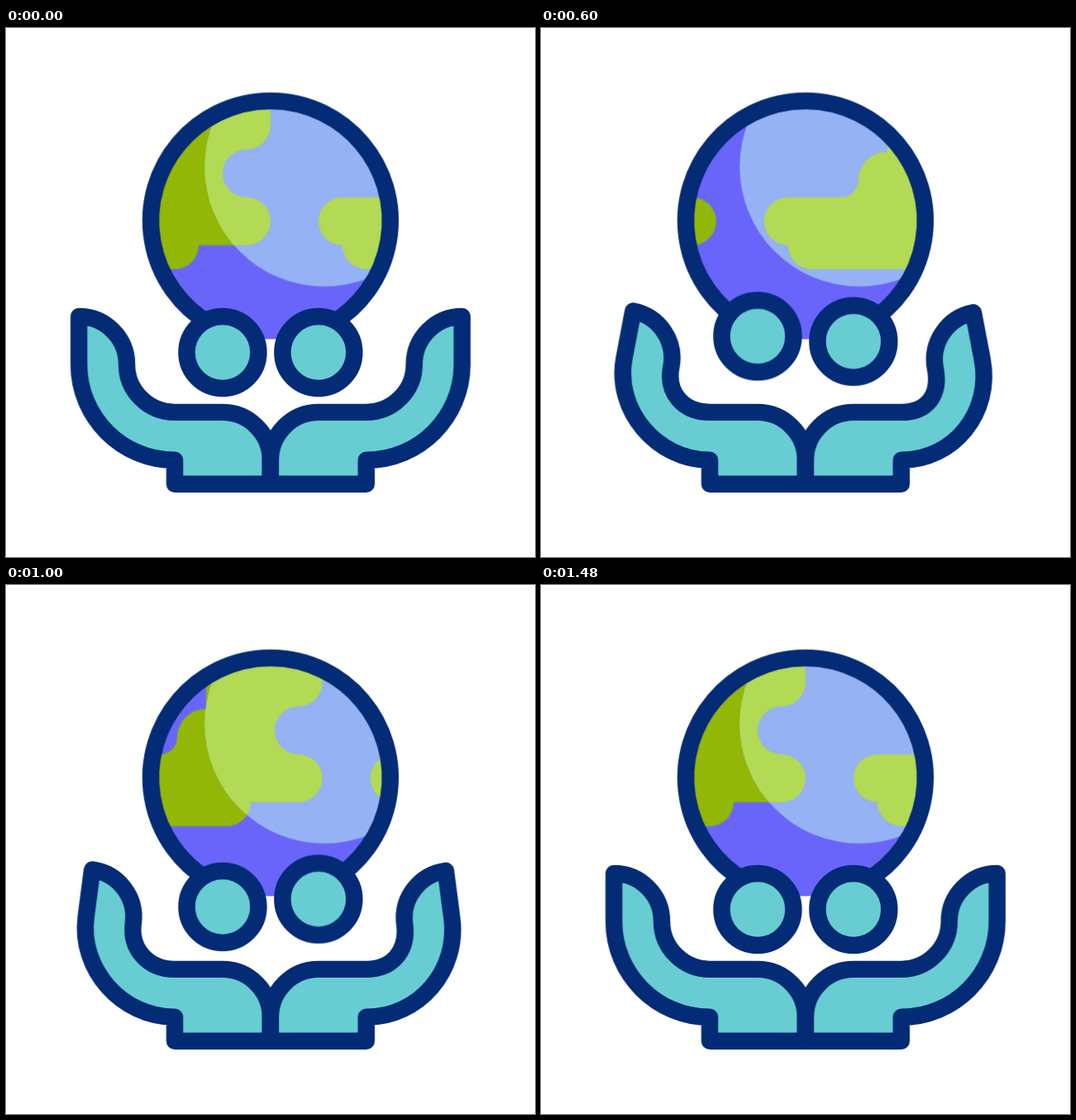
An HTML page for the animation above (1600 ms loop, 640x640 px).

```html
<!DOCTYPE html>
<html lang="en">
<head>
<meta charset="utf-8">
<title>Earth in caring hands</title>
<style>
  html, body { margin: 0; width: 100%; height: 100%; overflow: hidden; background: #fff; }
  svg { display: block; width: 100%; height: 100%; }

  .line { fill: #67cdd2; stroke: #032b76; stroke-width: .707; stroke-linejoin: round; stroke-linecap: round; }
  .ring { fill: none; }
  .sea { fill: #6a65fa; }
  .soil { fill: #92b706; }
  .lit .sea { fill: #94b2f4; }
  .lit .soil { fill: #b2da54; }

  .land { animation: spin 1.6s infinite; }
  .head { animation: 1.6s cubic-bezier(.53, 0, .47, 1) infinite; }
  .head.l { animation-name: hop-l; }
  .head.r { animation-name: hop-r; }
  .hand { animation: 1.6s cubic-bezier(.45, 0, .55, 1) infinite; }
  .hand.l { animation-name: bend-l; }
  .hand.r { animation-name: bend-r; }

  @keyframes spin {
    0% { transform: translateX(0); animation-timing-function: cubic-bezier(.527, 0, .473, 1); }
    92.5%, 100% { transform: translateX(-12px); }
  }
  @keyframes hop-l {
    0%, 14.3%, 71.2%, 100% { transform: translateY(0); }
    42.7% { transform: translateY(-.71px); }
  }
  @keyframes hop-r {
    0%, 21.3%, 78.2%, 100% { transform: translateY(0); }
    49.8% { transform: translateY(-.71px); }
  }
  @keyframes bend-l {
    0%, 5.6%, 85.3%, 100% {
      d: path("M-8 9L-8 11C-8 13.21 -6.21 15 -4 15L-4 16L0 16L0 15C0 13.9 -.9 13 -2 13L-4 13C-5.1 13 -6 12.1 -6 11C-6 9.9 -6.9 9 -8 9Z");
    }
    44.7%, 46.25% {
      d: path("M-7.145 8.762L-7.543 10.722C-7.982 12.887 -6.21 15 -4 15L-4 16L0 16L0 15C0 13.9 -.9 13 -2 13L-4 13C-5.1 13 -5.803 12.202 -5.583 11.119C-5.363 10.036 -6.062 8.982 -7.145 8.762Z");
    }
  }
  @keyframes bend-r {
    0%, 5.6%, 85.3%, 100% {
      d: path("M-8 9L-8 11C-8 13.21 -6.21 15 -4 15L-4 16L0 16L0 15C0 13.9 -.9 13 -2 13L-4 13C-5.1 13 -6 12.1 -6 11C-6 9.9 -6.9 9 -8 9Z");
    }
    44.7%, 46.25% {
      d: path("M-6.944 8.831L-7.342 10.791C-7.781 12.956 -6.21 15 -4 15L-4 16L0 16L0 15C0 13.9 -.9 13 -2 13L-4 13C-5.1 13 -5.602 12.271 -5.382 11.188C-5.162 10.105 -5.861 9.051 -6.944 8.831Z");
    }
  }
</style>
</head>
<body>
<svg viewBox="0 0 640 640">
  <defs>
    <clipPath id="globe"><circle cy="5" r="4.95"/></clipPath>
    <clipPath id="light"><circle cx="2.25" cy="2.75" r="5"/></clipPath>
    <path id="soil" d="M12 -1V1A1 1 0 0 1 11 2A1 1 0 0 0 11 4A1 1 0 0 1 11 6H9A1 1 0 0 1 8 7H4A1 1 0 0 1 3 6A1 1 0 0 1 3 4H5.24A.69 .69 0 0 0 5.93 3.31A1.21 1.21 0 0 1 7.14 2.1V-1Z"/>
  </defs>

  <!-- one unit of the icon grid is 28.975 px -->
  <g transform="translate(320 88.2) scale(28.975)">
    <g clip-path="url(#globe)">
      <g>
        <circle class="sea" cy="5" r="5"/>
        <g class="land soil">
          <use href="#soil" x="-12" y=".02"/>
          <use href="#soil" y=".02"/>
          <use href="#soil" x="12" y=".02"/>
        </g>
      </g>
      <g class="lit" clip-path="url(#light)">
        <circle class="sea" cy="5" r="5"/>
        <g class="land soil">
          <use href="#soil" x="-12" y=".02"/>
          <use href="#soil" y=".02"/>
          <use href="#soil" x="12" y=".02"/>
        </g>
      </g>
    </g>
    <path class="line ring" d="M-2.55 9.3A5 5 0 1 1 2.55 9.3"/>

    <circle class="line head l" cx="-2" cy="10.5" r="1.5"/>
    <circle class="line head r" cx="2" cy="10.5" r="1.5"/>

    <path class="line hand l" d="M-8 9L-8 11C-8 13.21 -6.21 15 -4 15L-4 16L0 16L0 15C0 13.9 -.9 13 -2 13L-4 13C-5.1 13 -6 12.1 -6 11C-6 9.9 -6.9 9 -8 9Z"/>
    <g transform="scale(-1 1)">
      <path class="line hand r" d="M-8 9L-8 11C-8 13.21 -6.21 15 -4 15L-4 16L0 16L0 15C0 13.9 -.9 13 -2 13L-4 13C-5.1 13 -6 12.1 -6 11C-6 9.9 -6.9 9 -8 9Z"/>
    </g>
  </g>
</svg>
</body>
</html>
```
